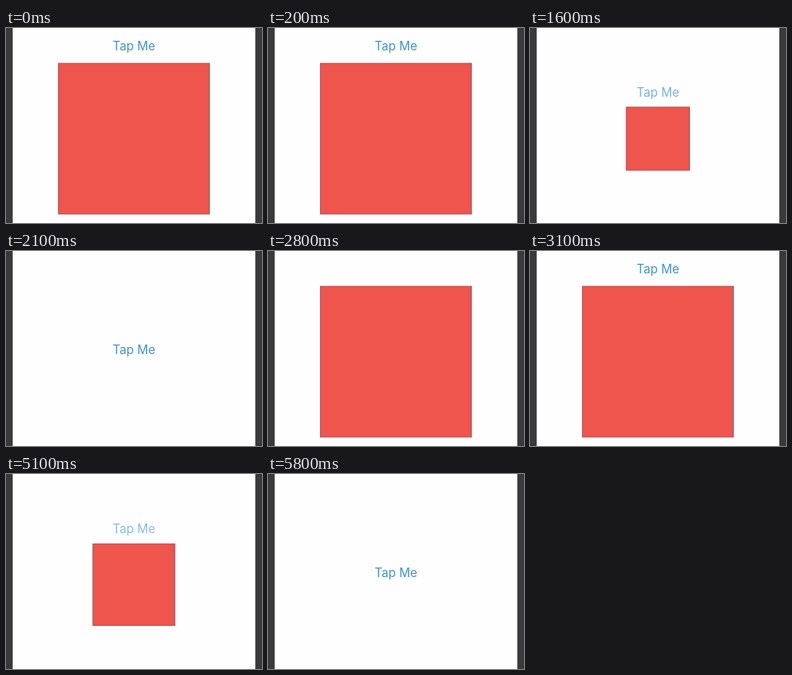
Animation, 320 px wide and 244 px high, one loop 9100 ms. Source, as an HTML page with a canvas:

```html
<!DOCTYPE html>
<html lang="en">
<head>
<meta charset="utf-8">
<title>Tap Me</title>
<style>
html, body { margin: 0; width: 100%; height: 100%; overflow: hidden; background: #fefefe; }
canvas { display: block; width: 320px; height: 244px; }
</style>
</head>
<body>
<canvas id="stage" width="320" height="244"></canvas>
<script>
const ctx = document.getElementById("stage").getContext("2d");
const LOOP = 9100, STEP = 100, DURATION = 350;
const HIDE_1 = 1409, SHOW = 2755, HIDE_2 = 4934;
const CENTER = { x: 159.8, y: 138.5 }, SIDE = 189.5;
const TOP_BASELINE = 28, MIDDLE_BASELINE = 129;

const bezier = (u, a, b) => 3 * a * u * (1 - u) ** 2 + 3 * b * u * u * (1 - u) + u ** 3;

// cubic-bezier(.42, 0, .58, 1)
function easeInOut(t) {
  if (t <= 0) return 0;
  if (t >= 1) return 1;
  let low = 0, high = 1;
  for (let i = 0; i < 24; i++) {
    const mid = (low + high) / 2;
    if (bezier(mid, 0.42, 0.58) < t) low = mid; else high = mid;
  }
  return bezier(low, 0, 1);
}

function stateAt(time) {
  const start = [HIDE_2, SHOW, HIDE_1].find(s => time >= s);
  if (start === undefined) return { scale: 1, drop: 0, alpha: 1 };
  const p = easeInOut((time - start) / DURATION);
  const alpha = 0.3 + 0.7 * p;
  return start === SHOW
    ? { scale: 1, drop: 1 - p, alpha }
    : { scale: 1 - p, drop: p, alpha };
}

function drawSquare(scale) {
  const side = SIDE * scale;
  if (side < 1) return;
  const x = CENTER.x - side / 2, y = CENTER.y - side / 2;
  ctx.fillStyle = "#ef544d";
  ctx.fillRect(x, y, side, side);
  ctx.lineWidth = 0.8;
  ctx.strokeStyle = "rgba(100, 90, 110, 0.5)";
  ctx.strokeRect(x + 0.4, y + 0.4, side - 0.8, side - 0.8);
  ctx.fillStyle = "rgba(95, 105, 130, 0.6)";
  ctx.fillRect(x + side - 0.9, y, 0.9, side);
}

function drawLabel(drop, alpha) {
  ctx.globalAlpha = alpha;
  ctx.fillStyle = "#4492c6";
  ctx.font = "15.2px Inter, Roboto, sans-serif";
  ctx.textAlign = "center";
  ctx.fillText("Tap Me", 160, TOP_BASELINE + (MIDDLE_BASELINE - TOP_BASELINE) * drop);
  ctx.globalAlpha = 1;
}

function drawBezel() {
  ctx.fillStyle = "#393939";
  ctx.fillRect(0, 0, 8.4, 244);
  ctx.fillRect(311.6, 0, 8.4, 244);
}

function render(now) {
  const time = Math.floor((now % LOOP) / STEP) * STEP;
  const { scale, drop, alpha } = stateAt(time);
  ctx.fillStyle = "#fefefe";
  ctx.fillRect(0, 0, 320, 244);
  drawBezel();
  drawLabel(drop, alpha);
  drawSquare(scale);
}

const origin = performance.now();
function tick() {
  render(performance.now() - origin);
  requestAnimationFrame(tick);
}
tick();
</script>
</body>
</html>
```
